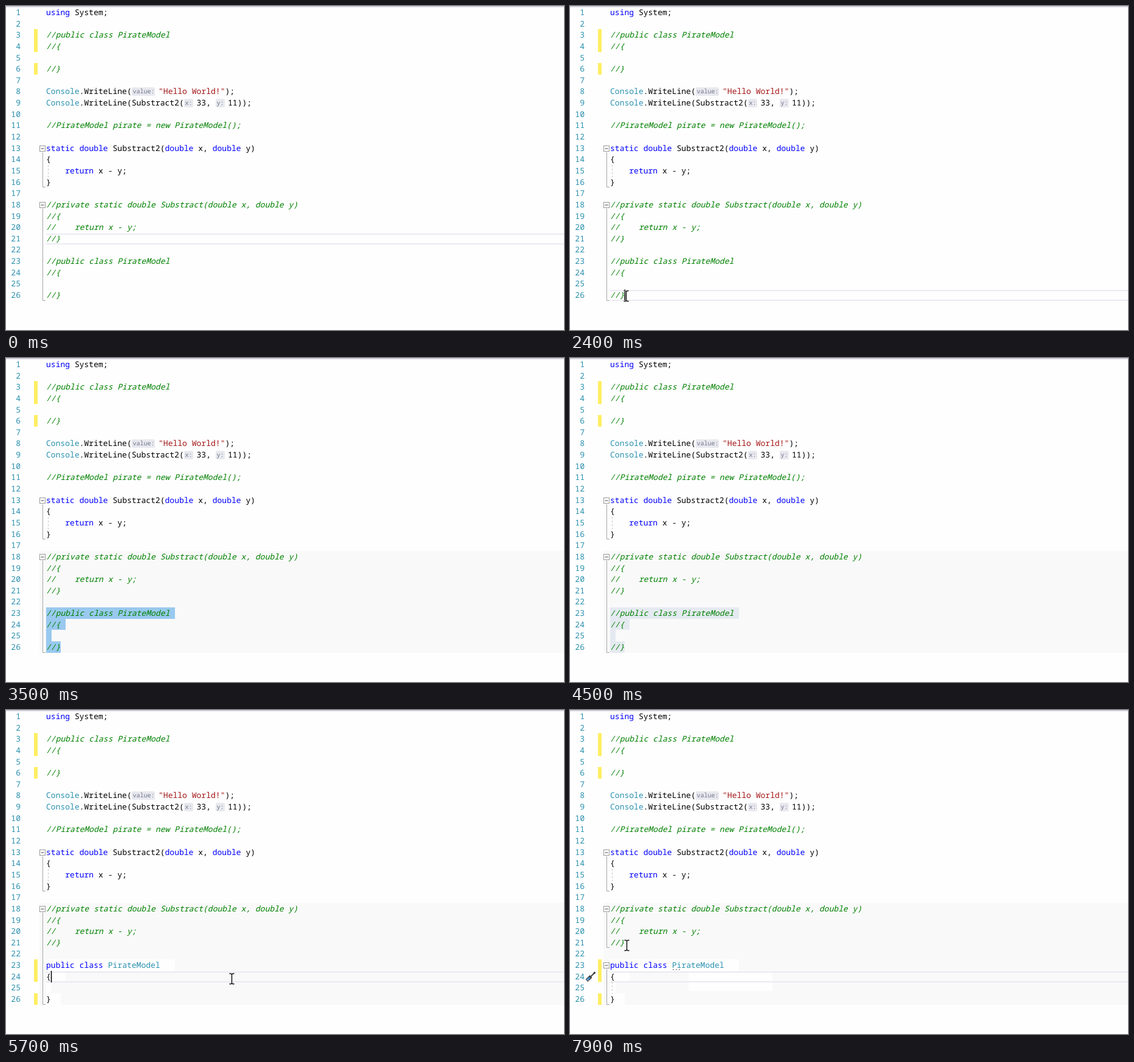
Animation, 918 px wide and 534 px high, one loop 8 s. Source, as an HTML page:

```html
<!DOCTYPE html>
<html lang="en">
<head>
<meta charset="utf-8">
<title>Uncommenting code</title>
<style>
html, body { margin: 0; width: 100%; height: 100%; overflow: hidden; background: #fefefe; }
svg { display: block; width: 918px; height: 534px; }
text { font: 13.04px "Noto Sans Mono", "DejaVu Sans Mono", monospace; white-space: pre; text-rendering: geometricPrecision; }
.num, .type { fill: #2b91af; }
.num { text-anchor: end; }
.key { fill: #0000ff; }
.str { fill: #a31515; }
.note { fill: #008000; font-style: italic; }
.hint { font-size: 10px; fill: #6f7688; }
.tip { font: 12px "Open Sans", sans-serif; }
</style>
</head>
<body>
<svg id="stage" viewBox="0 0 918 534"></svg>
<script>
(() => {
const NS = 'http://www.w3.org/2000/svg';
const stage = document.getElementById('stage');
const LOOP = 8000, STEP = 100, LEFT = 66, CHAR = 7.824;
const timed = [];

const rowTop = line => Math.round(1 + 18.64 * (line - 1));

function add(tag, attrs, parent = stage) {
  const node = document.createElementNS(NS, tag);
  for (const name in attrs) node.setAttribute(name, attrs[name]);
  parent.appendChild(node);
  return node;
}

const rect = (x, y, width, height, fill, parent) => add('rect', { x, y, width, height, fill }, parent);
const path = (d, stroke, width = 1, parent = stage) =>
  add('path', { d, stroke, 'stroke-width': width, fill: 'none' }, parent);

// Group visible during the given [from, to) spans
function during(...spans) {
  const group = add('g', {});
  timed.push({ group, spans });
  return group;
}

function tokens(source) {
  if (source.startsWith('//')) return [[source, 'note']];
  return source.split(/("[^"]*"|\b(?:using|static|double|return|public|class|Console|PirateModel)\b)/)
    .filter(Boolean)
    .map(part => [part, part[0] === '"' ? 'str'
      : /^(Console|PirateModel)$/.test(part) ? 'type'
      : /^(using|static|double|return|public|class)$/.test(part) ? 'key' : 'plain']);
}

function code(line, source, x = LEFT, parent = stage) {
  const text = add('text', { x, y: rowTop(line) + 14 }, parent);
  for (const [part, kind] of tokens(source)) {
    add('tspan', { class: kind }, text).textContent = part;
  }
}

function hint(line, label, x, width) {
  add('rect', { x, y: rowTop(line) + 3, width, height: 14, rx: 2, fill: '#e8e8ef' });
  add('text', { x: x + 1.5, y: rowTop(line) + 13, class: 'hint' }).textContent = label;
}

function selection(parent, widths, fill) {
  widths.forEach((w, i) => {
    if (w) rect(LEFT, rowTop(23 + i), w, rowTop(24 + i) - rowTop(23 + i), fill, parent);
  });
}

function currentLine(line, parent) {
  rect(LEFT, rowTop(line) + 1, 860, 2, '#eaeaf2', parent);
  rect(LEFT, rowTop(line) + 17, 860, 2, '#eaeaf2', parent);
}

function foldBox(line, parent) {
  const y = rowTop(line) + 5.5;
  add('rect', { x: 55.5, y, width: 9, height: 9, fill: '#fff', stroke: '#999' }, parent);
  path(`M57.5 ${y + 4.5}h5`, '#444', 1, parent);
}

const foldLine = (from, to, parent) => path(`M60.5 ${from}V${to}.5H65`, '#a5a5a5', 1, parent);

function guide(line, parent) {
  path(`M69.5 ${rowTop(line)}v20`, '#c4c4c4', 1, parent).setAttribute('stroke-dasharray', '3 3');
}

function changeBar(from, to, parent) {
  rect(46, rowTop(from), 6, rowTop(to + 1) - rowTop(from), '#ffee62', parent);
}

function caret(line, x, ...spans) {
  rect(x, rowTop(line), 1.5, 19, '#000', during(...spans));
}

function screwdriver(line, ...spans) {
  const g = during(...spans);
  g.setAttribute('transform', `translate(26 ${rowTop(line)})`);
  path('M8 9.5L14 3.5', '#424242', 2, g);
  path('M13 4.5L15.5 2', '#424242', 3, g);
  path('M1.5 16L8.5 9', '#424242', 5.5, g);
  path('M2.2 15.2L6.5 11', '#3f8fd0', 3, g);
  path('M2 13.5L5 16.5', '#fff', 0.8, g);
}

// Backgrounds
rect(0, 0, 918, 534, '#fefefe');
rect(0, 0, 918, 2, '#cfcfdc');
rect(55, 318, 863, 168, '#f9f9f9', during([3300, LOOP]));
const full = [212, 32, 9, 24], short = [196, 16, 9, 8];
selection(during([4600, LOOP]), full, '#fefefe');
rect(195, 432, 138, 31, '#fefefe', during([7400, LOOP]));

currentLine(21, during([0, 2400]));
currentLine(26, during([2400, 2500]));
currentLine(24, during([5600, LOOP]));

const BLUE = '#99c9ef';
selection(during([2500, 2600]), [0, 0, 9, 24], BLUE);
selection(during([2600, 2700]), [0, 32, 9, 24], BLUE);
selection(during([2700, 4500]), full, BLUE);
selection(during([4500, 4600]), full, '#e5eaf1');
selection(during([4600, 5600]), short, BLUE);

// Margin
for (let n = 1; n <= 26; n++) {
  add('text', { x: 24, y: rowTop(n) + 14, class: 'num' }).textContent = n;
}
changeBar(3, 4);
changeBar(6, 6);
const bars = during([4600, LOOP]);
changeBar(23, 24, bars);
changeBar(26, 26, bars);

foldLine(241, 298);
foldLine(334, 485, during([0, 6200]));
const split = during([6200, LOOP]);
foldLine(334, 391, split);
foldLine(427, 485, split);
foldBox(13);
foldBox(18);
foldBox(23, split);
guide(15);
guide(25, split);

// Code
const lines = {
  1: 'using System;',
  3: '//public class PirateModel',
  4: '//{',
  6: '//}',
  8: 'Console.WriteLine(',
  9: 'Console.WriteLine(Substract2(',
  11: '//PirateModel pirate = new PirateModel();',
  13: 'static double Substract2(double x, double y)',
  14: '{',
  15: '    return x - y;',
  16: '}',
  18: '//private static double Substract(double x, double y)',
  19: '//{',
  20: '//    return x - y;',
  21: '//}'
};
for (const n in lines) code(+n, lines[n]);
hint(8, 'value:', 207, 38);
code(8, '"Hello World!");', 251);
hint(9, 'x:', 293, 15);
code(9, '33,', 313.5);
hint(9, 'y:', 345, 15);
code(9, '11));', 365);

const commented = during([0, 4600]), live = during([4600, LOOP]);
[[23, 'public class PirateModel'], [24, '{'], [26, '}']].forEach(([n, source]) => {
  code(n, '//' + source, LEFT, commented);
  code(n, source, LEFT, live);
});

const dots = during([6400, LOOP]);
for (let i = 0; i < 3; i++) rect(169 + i * 5, 427, 2, 1.5, '#8a8a8a', dots);

screwdriver(26, [5200, 5600]);
screwdriver(24, [5900, LOOP]);

caret(26, LEFT + 3 * CHAR, [2400, 2500]);
caret(25, LEFT, [2500, 2600]);
caret(24, LEFT, [2600, 2700]);
caret(23, LEFT, [2700, 3200], [3700, 4200], [4600, 5100]);
caret(24, LEFT + CHAR, [5600, 5900], [6400, 6900], [7400, 7900]);

// Quick info
const tip = during([6900, 7400]);
add('rect', { x: 195.5, y: 433.5, width: 137, height: 29, fill: '#f7f7f7', stroke: '#cccedb' }, tip);
rect(202, 442, 11, 11, '#c27d1a', tip);
const info = add('text', { x: 219, y: 452, class: 'tip' }, tip);
add('tspan', { class: 'key' }, info).textContent = 'class ';
add('tspan', { class: 'type' }, info).textContent = 'PirateModel';

// Mouse pointer: runs of [time, x, y]
const mouse = add('g', {});
const beam = 'M-3.5 -8.5H-1L0.5 -7.5L2 -8.5H4.5M0.5 -7.5V7.5M-3.5 8.5H-1L0.5 7.5L2 8.5H4.5';
path(beam, '#fff', 3, mouse);
path(beam, '#000', 1.4, mouse);
const runs = [
  [[1000, 905, 62], [1400, 593, 240], [1800, 173, 463], [2100, 136, 488], [2300, 136, 488],
   [2400, 92, 478], [2500, 80, 460], [2600, 70, 441], [2700, 65, 423], [2900, 65, 423],
   [3100, 127, 405], [3300, 532, 322], [3400, 912, 154], [3500, 912, 154]],
  [[4800, 897, 90], [5000, 530, 320], [5100, 411, 394], [5200, 387, 424], [5300, 377, 443],
   [5600, 371, 443], [6300, 371, 443], [6500, 265, 441], [6600, 200, 433], [6900, 199, 424],
   [7300, 199, 424], [7500, 150, 414], [7600, 124, 403], [7700, 95, 391], [7800, 95, 391],
   [7900, 93, 388], [LOOP, 93, 388]]
];

function pointer(t) {
  const run = runs.find(r => t >= r[0][0] && t < r[r.length - 1][0]);
  if (!run) return null;
  const i = run.findIndex(key => key[0] > t);
  const [t0, x0, y0] = run[i - 1], [t1, x1, y1] = run[i];
  const k = (t - t0) / (t1 - t0);
  return [Math.round(x0 + (x1 - x0) * k), Math.round(y0 + (y1 - y0) * k)];
}

function draw(now) {
  const t = Math.floor(now % LOOP / STEP) * STEP;
  for (const { group, spans } of timed) {
    group.style.display = spans.some(([from, to]) => t >= from && t < to) ? '' : 'none';
  }
  const at = pointer(t);
  mouse.style.display = at ? '' : 'none';
  if (at) mouse.setAttribute('transform', `translate(${at[0]} ${at[1]})`);
}

let start;
function tick(now) {
  start ??= now;
  draw(Math.max(0, now - start));
  requestAnimationFrame(tick);
}
draw(0);
requestAnimationFrame(tick);
})();
</script>
</body>
</html>
```
